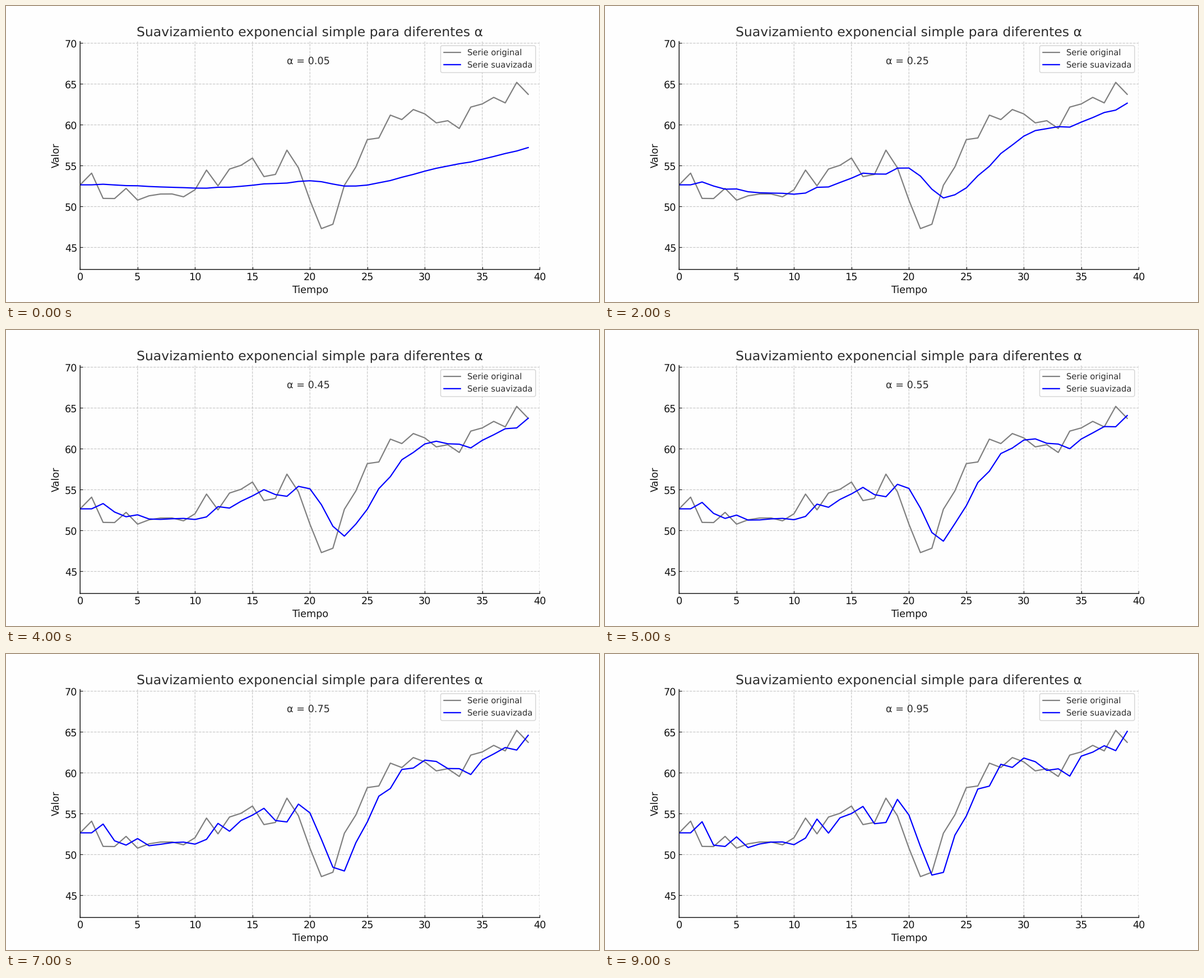
Write a matplotlib script that moves like this. It is 1058x529 px and loops after 9500 ms.

```python
import numpy as np
import matplotlib.pyplot as plt
from matplotlib.animation import FuncAnimation

STEPS = 19
INTERVAL = 500

plt.rcParams.update({
    "font.family": "DejaVu Sans",
    "font.size": 12,
    "text.color": "#2c2c2c",
    "text.hinting": "none",
    "path.snap": False,
    "axes.labelcolor": "#141414",
    "axes.edgecolor": "#141414",
    "axes.linewidth": 1.0,
    "axes.titlesize": 16,
    "axes.labelsize": 12,
    "axes.spines.top": False,
    "axes.spines.right": False,
    "xtick.direction": "in",
    "ytick.direction": "in",
    "xtick.color": "#141414",
    "ytick.color": "#141414",
    "legend.fontsize": 10,
})

# Random walk around 50
np.random.seed(10)
time = np.arange(40)
values = 50 + np.cumsum(np.random.normal(0, 2, len(time)))


def smooth(data, alpha):
    """One-step-ahead simple exponential smoothing."""
    out = [data[0]]
    for value in data[:-1]:
        out.append(alpha * value + (1 - alpha) * out[-1])
    return np.array(out)


fig, ax = plt.subplots(figsize=(10, 5), dpi=105.8, facecolor="#fefefe")
ax.set_facecolor("#fefefe")
ax.plot(time, values, color="gray", lw=1.5, label="Serie original")
curve, = ax.plot([], [], color="blue", lw=1.5, label="Serie suavizada")
caption = ax.text(0.45, 0.9, "", transform=ax.transAxes, fontsize=12)

ax.set_xlim(0, 40)
ax.set_ylim(values.min() - 5, values.max() + 5)
ax.set_title("Suavizamiento exponencial simple para diferentes α")
ax.set_xlabel("Tiempo")
ax.set_ylabel("Valor")
ax.grid(True, ls="--", lw=0.8, color="#b0b0b0", alpha=0.7)
ax.legend(loc="upper right")


def update(step):
    alpha = 0.05 * (step + 1)
    curve.set_data(time, smooth(values, alpha))
    caption.set_text(f"α = {alpha:.2f}")
    return curve, caption


anim = FuncAnimation(fig, update, frames=STEPS, interval=INTERVAL,
                     repeat=True, repeat_delay=0)
plt.show()
```
